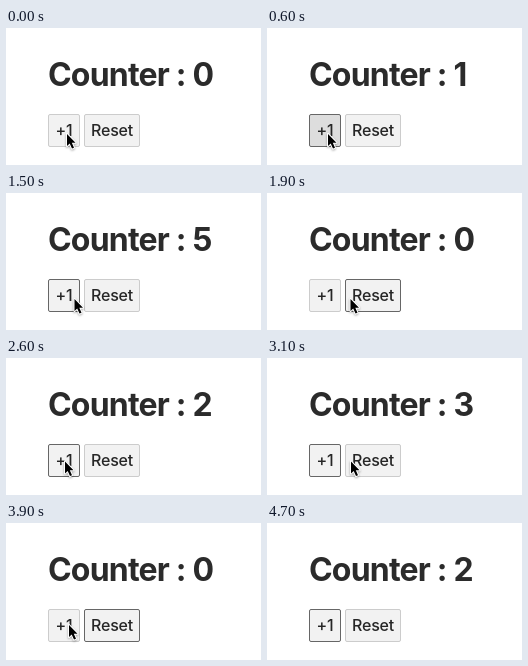
An HTML page for the animation above (5.3 s loop, 255 px wide and 137 px high).

```html
<!DOCTYPE html>
<html lang="en">
<head>
<meta charset="utf-8">
<title>Counter</title>
<style>
  html, body { margin: 0; height: 100%; overflow: hidden; background: #fff; }
  svg { display: block; width: 255px; height: 137px; font: 450 16px Inter, sans-serif; fill: #262626; }
  .title { font-size: 32px; font-weight: 700; letter-spacing: -.025em; fill: #2b2b2b; }
  .button rect { fill: #f2f2f2; stroke: #ccc; }
  .button text { text-anchor: middle; letter-spacing: -.015em; }
  .button.focus rect { stroke: #666; }
  .button.active rect { fill: #ddd; }
  #cursor { fill: #000; stroke: #fff; stroke-linejoin: round; paint-order: stroke; stroke-width: 2; filter: drop-shadow(0 1px 1px #0005); }
</style>
</head>
<body>
<svg viewBox="0 0 255 137">
  <text class="title" x="42" y="57.7">Counter : <tspan id="count">0</tspan></text>
  <g class="button" id="plus">
    <rect x="42.5" y="86.5" width="31" height="32" rx="1.5"/>
    <text x="58" y="108">+1</text>
  </g>
  <g class="button" id="reset">
    <rect x="78.5" y="86.5" width="55" height="32" rx="1.5"/>
    <text x="106" y="108">Reset</text>
  </g>
  <path id="cursor" d="M0 0V12L2.7 9.4L5 14.6L7 13.7L4.8 8.7H8.5Z"/>
</svg>
<script>
const LOOP = 5300, STEP = 100;
const WAKE = 100, LEAVE = 4700;
const $ = id => document.getElementById(id);

// Runs of clicks: button, release times, how long the button is held down.
const runs = [
  { id: 'plus', clicks: [600, 700, 1000, 1100, 1300], hold: 100 },
  { id: 'reset', clicks: [1900], hold: 200 },
  { id: 'plus', clicks: [2300, 2600, 2800], hold: 100 },
  { id: 'reset', clicks: [3300], hold: 100 },
  { id: 'plus', clicks: [4400, 4600], hold: 100 },
];

// Pointer glides between resting places.
const home = { x: 61, y: 106 };
const glides = [
  { from: 1400, to: 1700, x: 83.5, y: 106 },
  { from: 1900, to: 2100, x: 59, y: 103.5 },
  { from: 2900, to: 3100, x: 84, y: 103.5 },
  { from: 3600, to: 3900, x: 63, y: 102 },
];

function stateAt(t) {
  const state = { count: 0, focused: t < WAKE ? '' : 'reset', pressed: false };
  for (const { id, clicks, hold } of runs) {
    for (const up of clicks) {
      if (t < up - hold) return state;
      state.focused = id;
      state.pressed = t < up;
      if (t >= up) state.count = id === 'plus' ? state.count + 1 : 0;
    }
  }
  return state;
}

function pointerAt(t) {
  let { x, y } = home;
  for (const g of glides) {
    const k = Math.min(1, Math.max(0, (t - g.from) / (g.to - g.from)));
    x += (g.x - x) * k;
    y += (g.y - y) * k;
  }
  return `translate(${x} ${y})`;
}

function draw(now) {
  const t = Math.floor(now % LOOP / STEP) * STEP;
  const { count, focused, pressed } = stateAt(t);
  $('count').textContent = count;
  for (const id of ['plus', 'reset']) {
    $(id).classList.toggle('focus', id === focused);
    $(id).classList.toggle('active', id === focused && pressed);
  }
  $('cursor').setAttribute('transform', pointerAt(t));
  $('cursor').setAttribute('visibility', t < LEAVE ? 'visible' : 'hidden');
  requestAnimationFrame(draw);
}
draw(0);
</script>
</body>
</html>
```
